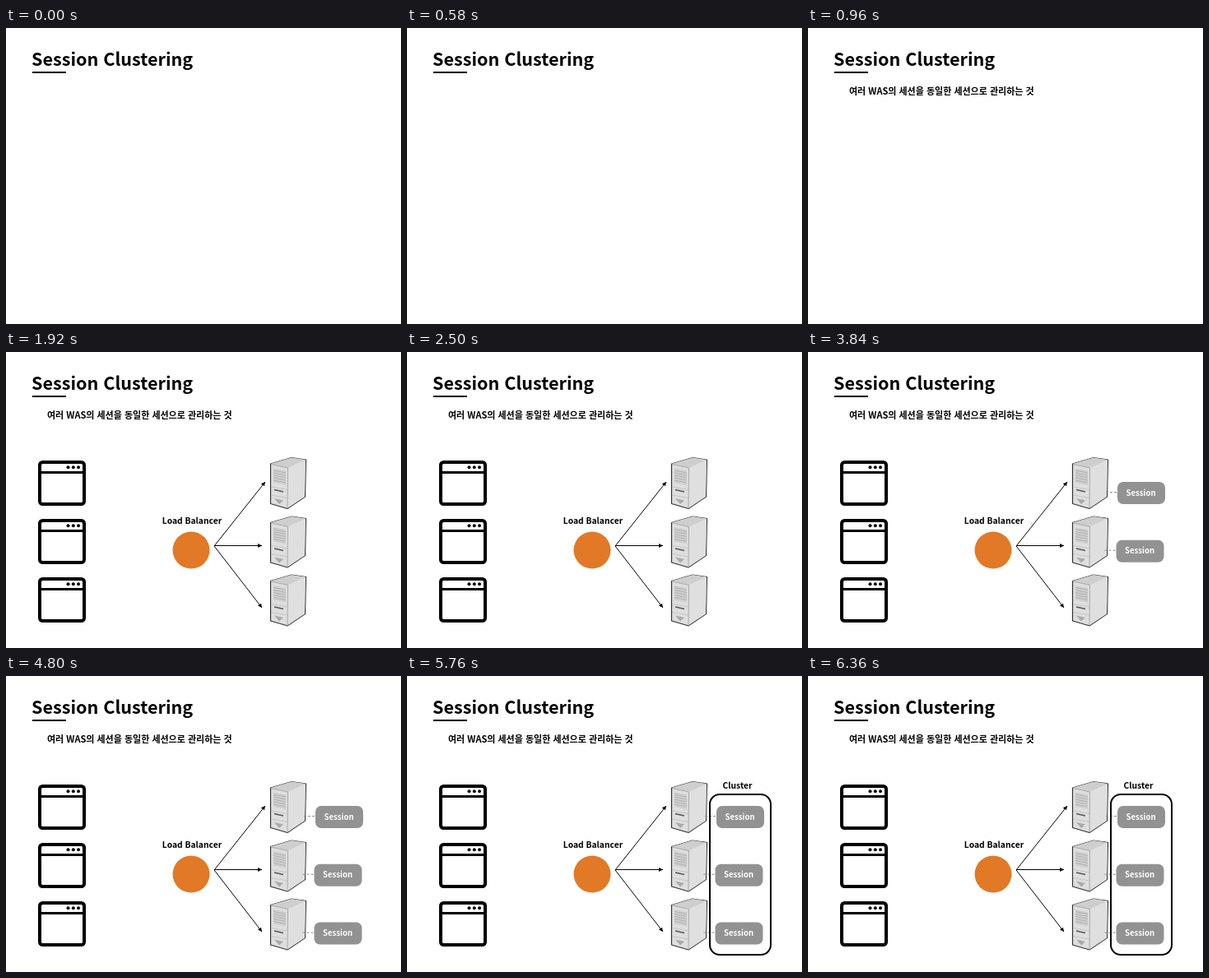
These frames come from a looping animation (480 by 360 pixels, 6760 ms). An HTML page:

```html
<!DOCTYPE html>
<html lang="ko">
<head>
<meta charset="utf-8">
<title>Session Clustering</title>
<style>
  html, body { margin: 0; width: 100%; height: 100%; overflow: hidden; background: #fff; }
  svg { display: block; width: 100vw; height: 100vh; }
  text { font: 700 10.3px "Noto Sans CJK KR", "Noto Sans CJK", "Noto Sans", sans-serif; }
  .mid { text-anchor: middle; }
  .line { fill: none; stroke: #000; }
  [data-step] { visibility: hidden; }
</style>
</head>
<body>
<svg viewBox="0 0 480 360">
  <defs>
    <g id="window">
      <rect class="line" x="41" y="134" width="54" height="51" rx="3.5" stroke-width="4"/>
      <path class="line" d="M41 146.5H95" stroke-width="3"/>
      <circle cx="75.5" cy="140.3" r="2"/>
      <circle cx="81.8" cy="140.3" r="2"/>
      <circle cx="88" cy="140.3" r="2"/>
    </g>
    <g id="server" stroke-linejoin="round">
      <path d="M321.5 136L347 128.5L364.5 131L363.5 176L342 190.5L321.5 184.5Z" fill="#dedede" stroke="#333" stroke-width="1.2"/>
      <path d="M321.5 136L347 128.5L364 131L342.5 141Z" fill="#cecece"/>
      <path d="M342.5 141L364 131.5L363 176L342 190Z" fill="#dfdfdf"/>
      <path class="line" d="M322 136.5L342.5 141L342 190" style="stroke:#aaa"/>
      <path d="M325 141.500L340 144.500V162L325 159Z" fill="#cfcfcf"/>
      <path class="line" d="M325 144l15 3m-15 0l15 3m-15 0l15 3m-15 0l15 3m-15 0l15 3" style="stroke:#aaa" stroke-width=".8"/>
      <path class="line" d="M322 164l20 3.500m-20 6.500l20 3.500" style="stroke:#bbb" stroke-width=".7"/>
      <path class="line" d="M326 167.500l11 2.500" style="stroke:#555" stroke-width="1.6"/>
      <path d="M326 178L337 180.500L332 185Z" fill="#aaa"/>
    </g>
    <g id="session">
      <path class="line" d="M362 170.500H376" style="stroke:#929292" stroke-dasharray="3 2"/>
      <rect x="376" y="158" width="58" height="27" rx="7" fill="#929292"/>
      <text class="mid" x="404.500" y="174.700" fill="#fff" style="font-size:9.6px">Session</text>
    </g>
    <marker id="tip" viewBox="0 0 5 5" refX="5" refY="2.5" markerWidth="5" markerHeight="5" orient="auto">
      <path d="M0 0L5 2.500L0 5Z"/>
    </marker>
  </defs>

  <text x="31" y="45.500" style="font-size:21.6px">Session Clustering</text>
  <rect x="32" y="53" width="41" height="2"/>

  <text data-step="1" x="50" y="80.500" style="font-size:11px">여러 WAS의 세션을 동일한 세션으로 관리하는 것</text>

  <g data-step="2">
    <use href="#window"/>
    <use href="#window" y="71"/>
    <use href="#window" y="142"/>
    <text class="mid" x="226" y="208.500">Load Balancer</text>
    <circle cx="225" cy="241" r="22.5" fill="#e27926"/>
    <g class="line" marker-end="url(#tip)">
      <path d="M253 236L315 158" marker-end="url(#tip)"/>
      <path d="M253 235.500H311" marker-end="url(#tip)"/>
      <path d="M253 236L311 311" marker-end="url(#tip)"/>
    </g>
    <use href="#server"/>
    <use href="#server" y="71.5"/>
    <use href="#server" y="142.5"/>
  </g>

  <use data-step="3" href="#session"/>
  <use data-step="4" href="#session" x="-1.5" y="70.7"/>
  <use data-step="5" href="#session" x="-1.5" y="141.5"/>

  <g data-step="6">
    <text class="mid" x="401.500" y="137.300">Cluster</text>
    <rect class="line" x="368" y="144" width="74" height="195" rx="12" stroke-width="2"/>
  </g>
</svg>
<script>
  const LOOP = 6760, STEP = 960;
  const parts = document.querySelectorAll('[data-step]');

  function draw() {
    const time = performance.now() % LOOP;
    for (const part of parts) {
      part.style.visibility = time >= part.dataset.step * STEP ? 'visible' : 'hidden';
    }
    requestAnimationFrame(draw);
  }
  draw();
</script>
</body>
</html>
```
